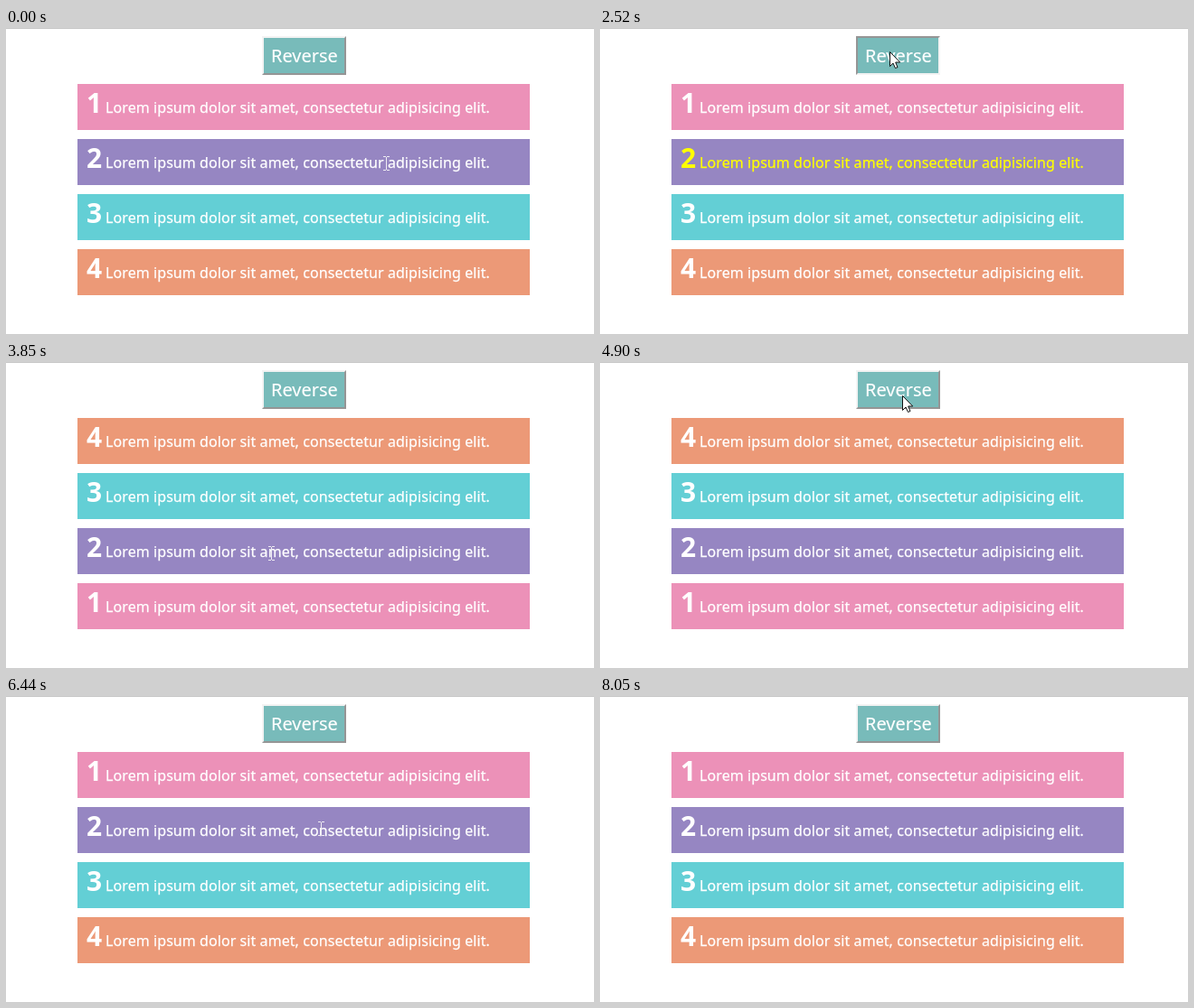
These frames come from a looping animation (650 by 339 pixels, 8260 ms). An HTML page:

```html
<!DOCTYPE html>
<html lang="en">
<head>
<meta charset="utf-8">
<title>Reverse list</title>
<style>
  html, body {
    margin: 0;
    width: 100%;
    height: 100%;
    overflow: hidden;
    background: #fff;
  }

  .stage {
    position: relative;
    box-sizing: border-box;
    width: 650px;
    height: 339px;
    overflow: hidden;
    color: #fff;
    font: 16px "Noto Sans", "Open Sans", sans-serif;
    white-space: nowrap;
    --loop: 8260ms infinite;
  }

  .stage::before {
    content: "";
    position: absolute;
    width: 100%;
    height: 1px;
    background: #c6c6c6;
  }

  .button {
    position: absolute;
    left: 283px;
    top: 9px;
    box-sizing: border-box;
    width: 93px;
    height: 43px;
    padding-left: 8px;
    border: 2px solid;
    border-color: #f3f3f3 #959595 #959595 #f3f3f3;
    background: #78bbba;
    font-size: 20px;
    line-height: 39px;
    -webkit-text-stroke: .15px;
    animation: press var(--loop) step-end;
  }

  .row {
    position: absolute;
    left: 79px;
    top: calc(62px + var(--i) * 61px);
    box-sizing: border-box;
    width: 500px;
    height: 51px;
    padding-left: 10px;
    line-height: 52px;
    letter-spacing: .07px;
    -webkit-text-stroke: .25px;
    background: var(--bg);
    animation: flip var(--loop) step-end;
  }

  .row b {
    font-size: 30px;
    line-height: 0;
    letter-spacing: -.3px;
    -webkit-text-stroke: 0;
  }

  .picked { animation: flip var(--loop) step-end, pick var(--loop) step-end; }

  .cursor {
    position: absolute;
    left: 0;
    top: 0;
    animation: move var(--loop) step-end;
  }

  .cursor svg { position: absolute; overflow: visible; }
  .arrow { left: 0; top: 0; animation: arrow var(--loop) step-end; }
  .beam { left: -3px; top: -8px; animation: beam var(--loop) step-end; }

  @keyframes press {
    30.5%, 60.16% { border-color: #959595 #f3f3f3 #f3f3f3 #959595; }
    0%, 33.05%, 61.86%, 100% { border-color: #f3f3f3 #959595 #959595 #f3f3f3; }
  }

  @keyframes flip {
    0%, 61.86%, 100% { transform: translateY(0); }
    33.05% { transform: translateY(calc((3 - 2 * var(--i)) * 61px)); }
  }

  @keyframes pick {
    0%, 46.61%, 88.13%, 100% { color: #fff; }
    10.16%, 84.74% { color: #ff0; }
  }

  /* Each stretch moves in 70 ms ticks. */
  @keyframes move {
    0% { transform: translate(420px, 150px); }
    16.94% { transform: translate(420px, 150px); animation-timing-function: steps(2, jump-start); }
    18.64% { transform: translate(402px, 130px); animation-timing-function: steps(3, jump-start); }
    21.18% { transform: translate(336px, 48px); animation-timing-function: steps(2, jump-start); }
    22.88% { transform: translate(320px, 26px); }

    36.44% { transform: translate(320px, 26px); animation-timing-function: steps(2, jump-start); }
    38.13% { transform: translate(320px, 50px); animation-timing-function: steps(5, jump-start); }
    42.37% { transform: translate(297px, 190px); animation-timing-function: steps(2, jump-start); }
    44.06% { transform: translate(293px, 212px); }

    50.84% { transform: translate(293px, 212px); animation-timing-function: steps(3, jump-start); }
    53.38% { transform: translate(299px, 186px); animation-timing-function: steps(5, jump-start); }
    57.62% { transform: translate(328px, 63px); animation-timing-function: steps(3, jump-start); }
    60.16% { transform: translate(334px, 37px); }

    66.94% { transform: translate(334px, 37px); animation-timing-function: steps(3, jump-start); }
    69.49% { transform: translate(336px, 52px); animation-timing-function: steps(6, jump-start); }
    74.57% { transform: translate(345px, 120px); animation-timing-function: steps(3, jump-start); }
    77.11% { transform: translate(347px, 135px); animation-timing-function: steps(2, jump-start); }
    78.81% { transform: translate(348px, 147px); }

    79.66% { transform: translate(348px, 147px); animation-timing-function: steps(6, jump-start); }
    84.74% { transform: translate(338px, 155px); }

    91.52% { transform: translate(338px, 155px); animation-timing-function: steps(2, jump-start); }
    93.22% { transform: translate(378px, 181px); animation-timing-function: steps(5, jump-start); }
    97.45% { transform: translate(604px, 330px); }
    97.46%, 100% { transform: translate(700px, 400px); }
  }

  /* The beam shows over lines of text, the arrow elsewhere. */
  @keyframes beam {
    0%, 16.94%, 19.49%, 38.13%, 42.37%, 55.93%, 71.18%, 77.11%, 93.22%, 94.91% { opacity: 1; }
    17.79%, 20.33%, 38.98%, 51.69%, 56.77%, 72.88%, 91.52%, 94.06%, 95.76%, 100% { opacity: 0; }
  }

  @keyframes arrow {
    0%, 16.94%, 19.49%, 38.13%, 42.37%, 55.93%, 71.18%, 77.11%, 93.22%, 94.91% { opacity: 0; }
    17.79%, 20.33%, 38.98%, 51.69%, 56.77%, 72.88%, 91.52%, 94.06%, 95.76%, 100% { opacity: 1; }
  }
</style>
</head>
<body>
<div class="stage">
  <div class="button">Reverse</div>
  <div class="row" style="--i: 0; --bg: #ec91b8"><b>1</b> Lorem ipsum dolor sit amet, consectetur adipisicing elit.</div>
  <div class="row picked" style="--i: 1; --bg: #9686c2"><b>2</b> Lorem ipsum dolor sit amet, consectetur adipisicing elit.</div>
  <div class="row" style="--i: 2; --bg: #63cfd5"><b>3</b> Lorem ipsum dolor sit amet, consectetur adipisicing elit.</div>
  <div class="row" style="--i: 3; --bg: #ec9977"><b>4</b> Lorem ipsum dolor sit amet, consectetur adipisicing elit.</div>
  <div class="cursor">
    <svg class="arrow" width="13" height="20">
      <path d="M.5 .5V16.5L4 13L6.5 18.5L9 17.5L6.7 12H11.7Z" fill="#fff" stroke="#111"/>
    </svg>
    <svg class="beam" width="7" height="16">
      <path d="M0 .5h3m1 0h3M3.5 1v14M0 15.5h3m1 0h3" fill="none" stroke="#efedf2"/>
    </svg>
  </div>
</div>
</body>
</html>
```
